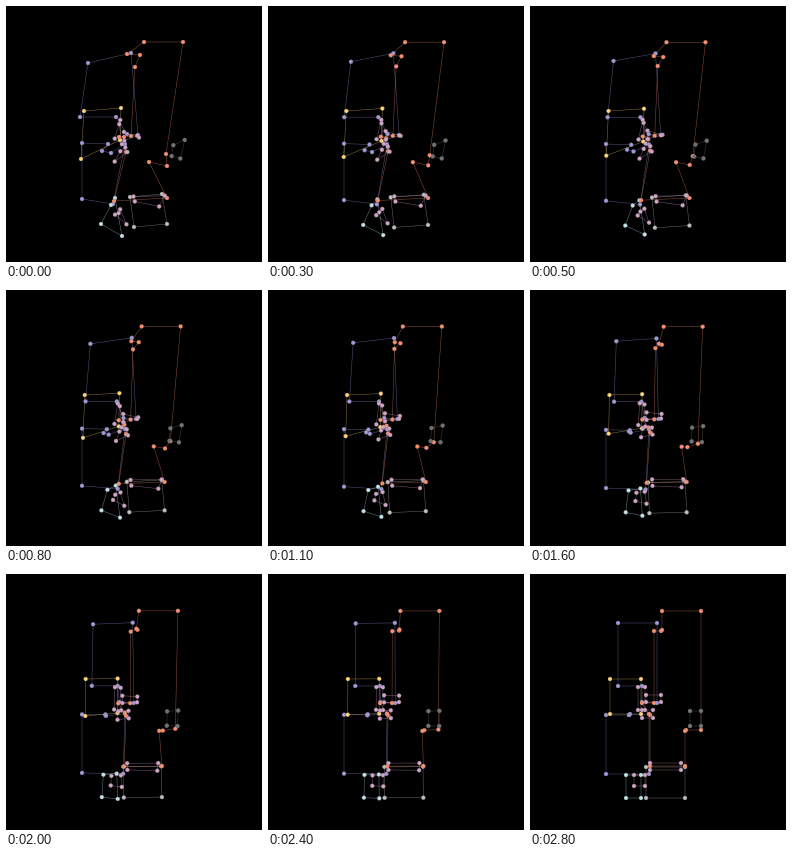
A matplotlib script that plays this animation: 256 px wide and 256 px high, repeating every 2900 ms.

```python
import matplotlib.pyplot as plt
import numpy as np
from matplotlib.animation import FuncAnimation
from matplotlib.collections import PolyCollection

SIZE, FRAMES, STEP_MS = 256, 29, 100

ORANGE, PURPLE, YELLOW = "#ff8c69", "#a097dc", "#ffd274"
SILVER, GREY, AQUA, MAUVE = "#bebebe", "#727171", "#bfe3e8", "#d3a2c7"

rng = np.random.default_rng(4)
rooms = []  # (color, resting corners, drift of each corner at the start)


def outline(color, *corners):
    """Add a free outline; each corner is x, y and its starting drift dx, dy."""
    c = np.array(corners, float)
    rooms.append((color, c[:, :2], c[:, 2:]))


def box(color, x0, y0, x1, y1, drift):
    """Add a rectangle, clockwise from its top left corner."""
    rest = np.array([(x0, y0), (x1, y0), (x1, y1), (x0, y1)], float)
    rooms.append((color, rest, np.array(drift, float)))


def door(color, x0, y0, x1, y1, shift):
    """Add a small rectangle that starts moved by shift, with scattered corners."""
    box(color, x0, y0, x1, y1, shift + rng.uniform(-6, 6, (4, 2)))


outline(PURPLE,
        (88, 49, -6, 8), (127, 49, -2, -2), (127, 129, 5, 0),
        (112, 128, 9, 0), (112, 112, -2, -1), (88, 112, -14, -1))
outline(PURPLE,
        (76, 141, 0, -4), (99, 141, 3, -3), (100, 140, -4, 5), (99, 141, 6, 6),
        (119, 140, 0, -2), (119, 200, -12, -2), (76, 200, 0, -7))
box(YELLOW, 80, 105, 111, 140, [(-2, 0), (4, -3), (3, -6), (-5, 13)])
box(SILVER, 116, 193, 155, 224, [(8, -2), (1, -5), (6, -6), (12, -3)])
box(AQUA, 96, 201, 111, 224, [(9, -2), (-2, -9), (5, 6), (-1, -6)])
outline(ORANGE,
        (132, 37, 6, -1), (171, 37, 6, -1), (171, 156, -11, -8),
        (156, 156, 5, 4), (155, 157, -12, -1), (155, 192, 6, 0),
        (120, 192, -12, 3), (120, 141, 0, 5), (119, 140, -1, -9),
        (112, 129, 1, 2), (124, 129, 1, 1), (124, 57, 5, 4),
        (131, 57, 3, -8), (132, 56, -11, -8))

door(GREY, 160, 137, 171, 152, (2, 2))
door(MAUVE, 120, 189, 151, 196, (3, 1))
door(MAUVE, 104, 201, 115, 212, (3, 1))
door(MAUVE, 116, 121, 131, 128, (2, 5))
door(MAUVE, 108, 113, 115, 136, (1, 0))
door(MAUVE, 112, 136, 123, 144, (0, 6))


def pose(frame):
    """Corners of every room; the drift eases out to nothing by the last frame."""
    left = (1 - frame / (FRAMES - 1)) ** 1.5
    return [rest + drift * left for _, rest, drift in rooms]


fig = plt.figure(figsize=(SIZE / 72, SIZE / 72), dpi=72, facecolor="black")
ax = fig.add_axes([0, 0, 1, 1])
ax.set(xlim=(0, SIZE), ylim=(SIZE, 0))
ax.axis("off")

start = pose(0)
walls = PolyCollection(start, facecolors="none", edgecolors=[c for c, *_ in rooms],
                       linewidths=0.5, alpha=0.55, snap=False)
ax.add_collection(walls)
dot_colors = [c for c, rest, _ in rooms for _ in rest]
dots = ax.scatter(*np.vstack(start).T, s=4 ** 2, c=dot_colors,
                  edgecolors="gray", linewidths=0.25, zorder=3, snap=False)


def draw(frame):
    shapes = pose(frame)
    walls.set_verts(shapes)
    dots.set_offsets(np.vstack(shapes))
    return walls, dots


anim = FuncAnimation(fig, draw, frames=FRAMES, interval=STEP_MS,
                     repeat=True, repeat_delay=0)
plt.show()
```
